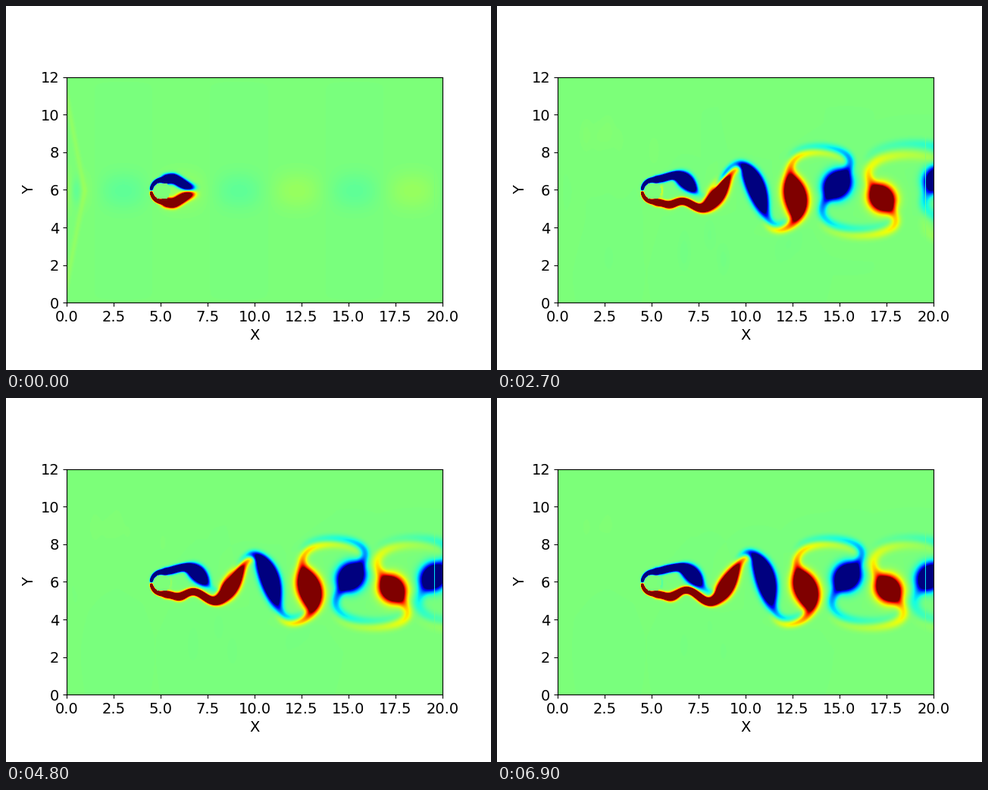
A matplotlib script that plays this animation: 640 px wide and 480 px high, repeating every 7 s.

```python
import numpy as np
import matplotlib.pyplot as plt
from matplotlib.animation import FuncAnimation

FRAMES = 70
PERIOD = 5.17          # frames per shedding cycle
MID = 5.93             # height of the wake axis
CYL_X, CYL_R = 5.08, 0.44
NX, NY = 496, 298

gx = ((np.arange(NX) + 0.5) / NX * 20).astype(np.float32)
gy = ((np.arange(NY) + 0.5) / NY * 12 - MID).astype(np.float32)
cell = 0.09
lattice_x = np.round(gx / cell) * cell
lattice_y = np.round(gy / cell) * cell
body = np.hypot(lattice_x[None, :] - CYL_X, lattice_y[:, None]) < CYL_R

# Age along the wake in shedding cycles; about zero where vortices roll up
age = np.linspace(-1.4, 4.1, 720)

rng = np.random.default_rng(4)
haze_x = rng.uniform(0.5, 13, 30)
haze_y = rng.uniform(1.8, 3.8, 30) * np.where(np.arange(30) % 2, 1, -1)
haze_phase = rng.uniform(0, 2 * np.pi, 30)


def smooth(t, a, b):
    u = np.clip((t - a) / (b - a), 0, 1)
    return u * u * (3 - 2 * u)


def bump(t, width):
    return np.exp(-(t / width) ** 2)


def render(x, y, sx, sy, weight):
    """Sum of Gaussian puffs on the grid."""
    x, y, sx, sy, weight = (
        np.broadcast_to(v, np.shape(x)).astype(np.float32)[:, None]
        for v in (x, y, sx, sy, weight))
    return (bump(gy - y, sy) * weight).T @ bump(gx - x, sx)


def ribbon(x, y, radius, strength):
    step = np.hypot(np.gradient(x), np.gradient(y))
    weight = strength * step / (radius * np.sqrt(np.pi))
    return render(x, y, radius, radius, weight)


def wake_row(frame, side):
    """One shear layer rolling up into a row of vortices; side is +1 or -1."""
    n = age
    phase = (frame - 69) / PERIOD
    swing = smooth(frame, 5, 18)

    # the front of the wake first lingers at the body, then travels along
    lead = 2.216 + (frame - 21) / PERIOD
    front = -0.5 + 0.5 * np.logaddexp(0, 2 * lead + 1)
    first = bump(front - n, 0.7) * smooth(n, -0.6, 0.6)
    fade = 1 - smooth(n, front, front + 0.3 + 0.9 * swing)

    # centre line: a growing wave, sheared by the turning vortices
    turn = 2 * np.pi * (n - phase)
    wave = -2.2 * swing * smooth(n, -0.6, 1.6) * np.sin(turn)
    shear = 1.2 * smooth(n, 0.8, 2)
    x = 5.1 + 4.4 * 0.37 * np.logaddexp(0, (n + 0.341) / 0.37)
    x = x + shear * wave * np.cos(turn) + 1.5 * first

    # position within the cycle, zero at the vortex cores of this row
    local = (n - phase - (0 if side > 0 else 0.5) + 0.5) % 1 - 0.5
    gap = 0.12 + 0.5 * (1 - smooth(n, -0.5, 0.7)) + 0.15 * bump(n + 0.4, 0.3)
    gap = gap + 0.2 * smooth(n, 0.3, 1) * bump(local, 0.15) + 0.5 * first
    gap = gap * (1 - 0.8 * (1 - swing) * smooth(n, front - 0.25, front + 0.25))
    y = wave + side * gap

    # cores grow rounder, wider and weaker with age
    length = 0.1 * (1 - 0.85 * smooth(n, 0.7, 2))
    wide = 0.13 + 0.19 * smooth(n, -0.7, 0) + 0.28 * smooth(n, 0.5, 2)
    wide = wide * (1 - 0.25 * first**3) * (1 + 0.4 * (1 - swing))
    thin = 0.15 + 0.05 * np.maximum(n, 0) + 0.05 * (1 - swing)
    radius = thin + (wide - thin) * bump(local, 1.5 * length) * smooth(swing, 0, 0.3)

    speed = np.hypot(np.gradient(x, n), np.gradient(y, n))
    gain = np.sqrt(1 + (wide / (length * speed)) ** 2)
    core = 4 * smooth(n, -0.6, -0.1) * np.exp(-0.18 * np.maximum(n, 0))
    core = core * gain * bump(local, length) * (1 - 0.5 * first**3)

    # attached sheet, then thin arms between the cores
    worn = n + 0.5 * np.maximum(np.sin(2 * np.pi * local), 0) * swing
    sheet = 3.6 * (1 - smooth(worn, 0.1, 0.65))
    arm = 0.7 * np.exp(-0.55 * n) * np.cos(np.pi * local)
    arm = arm + np.exp(-0.5 * n) * bump(local, 0.17)
    strength = np.maximum(sheet, core) + arm * smooth(n, 0, 0.5)
    return ribbon(x, y, radius, -side * strength * fade)


def body_layers(frame):
    """Boundary layer around the body and the flicker at its base."""
    angle = np.radians(np.linspace(172, 70, 40))
    x, y = CYL_X + 0.58 * np.cos(angle), 0.58 * np.sin(angle)
    radius = np.linspace(0.06, 0.11, 40)
    field = ribbon(x, y, radius, -4) + ribbon(x, -y, radius, 4)
    beat = np.sin(2 * np.pi * ((frame - 69) / PERIOD + 0.04))
    base = -0.5 * beat * smooth(frame, 3, 10)
    return field + render([5.53], 0, 0.08, 0.3, base)


def pressure_waves(frame):
    """Faint start-up ripple, then a slowly dying haze."""
    across = gy[:, None]
    ripple = 0.07 * np.cos(2 * np.pi * (gx - 18.4) / 6.15) * bump(across, 1)
    inlet = -0.12 * bump(gx - 0.5, 0.3) * bump(across, 0.8)
    arc = 0.05 * bump(gx - 0.95 + 0.19 * np.abs(across), 0.15)
    beat = np.maximum(np.sin(haze_phase + 0.9 * frame), 0)
    haze = 0.03 * smooth(frame, 1, 8) * np.exp(-frame / 60)
    return ((ripple + inlet + arc) * np.exp(-frame / 2)
            + render(haze_x, haze_y, 0.35, 0.9, haze * np.sign(haze_y) * beat))


def vorticity(frame):
    field = wake_row(frame, 1) + wake_row(frame, -1) + body_layers(frame)
    field = field + pressure_waves(frame)
    field[body] *= 0.03
    field = np.clip(field, -1, 1)
    field[:, 485] *= 0.3      # thin seam near the outlet
    return field


plt.rcParams["font.family"] = "DejaVu Sans"
plt.rcParams["font.size"] = 14
fig, ax = plt.subplots(figsize=(6.4, 4.8), dpi=100)
image = ax.imshow(vorticity(0), cmap="jet", vmin=-1, vmax=1, origin="lower",
                  extent=(0, 20, 0, 12), interpolation="nearest")
ax.set_xticks(np.arange(0, 20.1, 2.5))
ax.set_yticks(range(0, 13, 2))
ax.set_xlabel("X")
ax.set_ylabel("Y")


def update(frame):
    image.set_data(vorticity(frame))
    return [image]


anim = FuncAnimation(fig, update, frames=FRAMES, interval=100,
                     repeat=True, repeat_delay=0)
plt.show()
```
